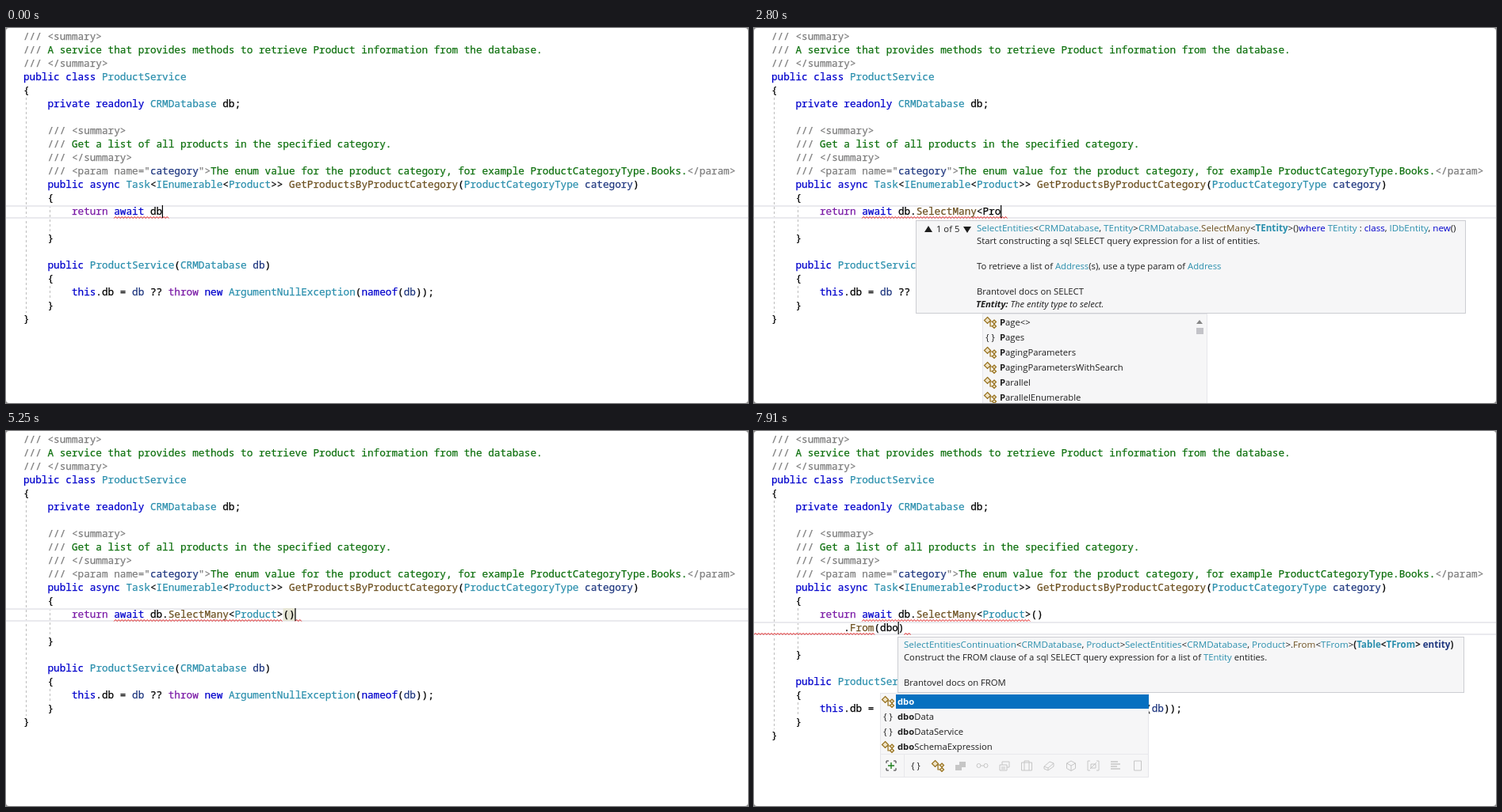
Write an HTML page that moves like this. It is 936 px wide and 474 px high and loops after 8000 ms.

```html
<!DOCTYPE html>
<html lang="en">
<head>
<meta charset="utf-8">
<title>Code completion</title>
<style>
  html, body { margin: 0; width: 100%; height: 100%; overflow: hidden; background: #8c8c8c; }
  svg { display: block; width: 936px; height: 474px; background: #fff; border-radius: 4px; }
  text, tspan { white-space: pre; fill: currentColor; }
  .code text, .code tspan { stroke: currentColor; stroke-width: .25px; }
  .code text { font: 500 12.695px "Noto Sans Mono", "DejaVu Sans Mono", monospace; color: #000; }
  .ui text { font: 11.25px "Open Sans", "Noto Sans", sans-serif; color: #1e1e1e; }
  .ui text.on { color: #fff; }
  .ui text.sign { font-size: 11.6px; }
  .k { color: #0000cc; } .c { color: #7a1aa6; } .t { color: #2b8fad; } .m { color: #6c5020; }
  .v { color: #1f377f; } .g { color: #7c7c7c; } .d { color: #0e700e; }
  .b { font-weight: 700; } .i { font-style: italic; }
</style>
</head>
<body>
<svg id="stage" viewBox="0 0 936 474"></svg>
<script>
const LOOP = 8000, CHAR = 7.617, ROW = 17, LEFT = 22, TOP = 3, ITEM = 19;
const stage = document.getElementById('stage');
const colX = col => LEFT + col * CHAR;
const rowY = row => TOP + row * ROW;

// Markup: [classes:text], one letter per class
const rich = s => s.replace(/&/g, '&amp;').replace(/</g, '&lt;')
  .replace(/\[(\w+):(.*?)\]/g, (_, c, body) => `<tspan class="${[...c].join(' ')}">${body}</tspan>`);
const plain = s => s.replace(/\[\w+:(.*?)\]/g, '$1');
const text = (x, y, s, cls = '') => `<text x="${x}" y="${y}" class="${cls}">${rich(s)}</text>`;
const rect = (x, y, w, h, fill, stroke = 'none') =>
  `<rect x="${x}" y="${y}" width="${w}" height="${h}" fill="${fill}" stroke="${stroke}"/>`;
const path = (d, stroke, fill = 'none', width = 1) =>
  `<path d="${d}" stroke="${stroke}" fill="${fill}" stroke-width="${width}"/>`;
const at = (x, y, body) => `<g transform="translate(${x} ${y})">${body}</g>`;

// ---- Code ----
const head = [
  '[g:/// <summary>]',
  '[g:///] [d:A service that provides methods to retrieve Product information from the database.]',
  '[g:/// </summary>]',
  '[k:public class] [t:ProductService]',
  '{',
  '    [k:private readonly] [t:CRMDatabase] db;',
  '',
  '    [g:/// <summary>]',
  '    [g:///] [d:Get a list of all products in the specified category.]',
  '    [g:/// </summary>]',
  '    [g:/// <param name="][v:category][g:">][d:The enum value for the product category, for example ProductCategoryType.Books.][g:</param>]',
  '    [k:public async] [t:Task]<[t:IEnumerable]<[t:Product]>> [m:GetProductsByProductCategory]([t:ProductCategoryType] [v:category])',
  '    {'
];
const tail = [
  '    }',
  '',
  '    [k:public] [t:ProductService]([t:CRMDatabase] [v:db])',
  '    {',
  '        [k:this].db = [v:db] ?? [c:throw] [k:new] [t:ArgumentNullException]([k:nameof]([v:db]));',
  '    }',
  '}'
];
const codeRow = (row, s) => text(LEFT, rowY(row) + 12, s);

function squiggle(x0, x1, row) {
  const n = Math.max(1, Math.round((x1 - x0) / 4));
  return path(`M${x0} ${rowY(row) + 16.5}` + 'l2-2l2 2'.repeat(n), '#e01010');
}

function editLine(row, s, from, active) {
  const shown = plain(s), caret = shown.indexOf('^'), bare = shown.replace('^', '');
  const paren = bare.indexOf('('), stop = paren < 0 ? bare.length : paren;
  let out = squiggle(from, colX(stop), row);
  if (active) out += squiggle(colX(bare.length), colX(bare.length) + 7, row);
  out += codeRow(row, s.replace('^', ''));
  if (caret >= 0) out += rect(colX(caret) - .4, rowY(row), 1.2, 16, '#000');
  return out;
}

function editor({ first, second, braces }) {
  const split = second !== undefined, shift = split ? 1 : 0, row = 13 + shift, y = rowY(row);
  const guide = (x, a, b) => `<path d="M${x} ${rowY(a)}V${rowY(b)}" stroke="#bdbdbd" stroke-dasharray="3 3"/>`;
  let out = guide(25.5, 5, 21 + shift) + guide(55.5, 13, 15 + shift) + guide(55.5, 19 + shift, 20 + shift);
  out += rect(0, y, 936, 2, '#eaeaee') + rect(0, y + 15, 936, 2, '#eaeaee');
  if (braces) out += rect(colX(43), y, 2 * CHAR, 16, '#e6e5d4');
  head.forEach((s, i) => out += codeRow(i, s));
  tail.forEach((s, i) => out += codeRow(15 + shift + i, s));
  out += editLine(13, '        [c:return] [k:await] db' + first, colX(15), !split);
  if (split) out += editLine(14, '            ' + second, 0, true);
  return `<g class="code">${out}</g>`;
}

// ---- Icons, drawn around their centre ----
const cube = (stroke, fill) => path('M0-6L5.5-3V3.5L0 6.5L-5.5 3.5V-3ZM-5.5-3L0 0L5.5-3M0 0V6.5', stroke, fill);
const icons = {
  cube: cube('#6936aa', '#eee5f7'),
  wrench: path('M-5.5 5.5L1-1', '#2a2a2a', 'none', 2.6) + path('M6-3.5A3.4 3.4 0 1 1 2.5-6L2-3L3.5-2Z', '#2a2a2a', '#2a2a2a'),
  type: path('M-3.5-6.5L.5-2.5L-3.5 1.5L-7.5-2.5ZM5-3L7.5-.5L5 2L2.5-.5ZM5 2.5L7.5 5L5 7.5L2.5 5ZM0-1H3M0-1V5H3', '#96701c', '#efe3c6', 1.2),
  space: '<text y="4" text-anchor="middle">{ }</text>',
  expand: path('M-6-3V-6H-3M3-6H6V-3M6 3V6H3M-3 6H-6V3', '#333') + path('M0-4V4M-4 0H4', '#1f801f', 'none', 1.4)
};
const pale = '#c6c6c6';
const paleIcons = [
  rect(-6, -1, 8, 7, pale) + rect(-1, -5, 8, 7, pale),
  path('M-7 0a2.5 2.5 0 1 0 5 0a2.5 2.5 0 1 0-5 0M-2 0H2a2.5 2.5 0 1 0 5 0a2.5 2.5 0 1 0-5 0', pale),
  path('M-6-1H3V6H-6ZM-3-1V-5H6V2H3M-4 2H1M-4 4H1', pale),
  path('M-6.5-4H6.5V6H-6.5ZM-3-4V-6H3V-4M-3-4V6M3-4V6', pale),
  path('M-6 1L1-5L6-3V1L-1 6L-6 4ZM-6 1L-1 3L6-3M-1 3V6', pale),
  cube(pale, 'none'),
  path('M-4-6H-7V6H-4M4-6H7V6H4M-4 4L4-4M-3-2H3V3H-3Z', pale),
  path('M-6-5H3M-6-2H6M-6 1H2M-6 4H6', pale, 'none', 1.5),
  path('M-4.5-6H4.5V6H-4.5Z', pale)
];

// ---- Popups ----
const C = 'cube', F = 'wrench', T = 'type', N = 'space';

function list({ x, y, w, items, sel = -1, thumb, filters, extra = false }) {
  const bar = y + ITEM * items.length + 1, right = thumb ? 18 : 0;
  let out = rect(x + .5, y + .5, w - 1, ITEM * items.length + 30, '#f6f6f7', '#e6e6ea');
  items.forEach(([icon, label], i) => {
    const mid = y + 11 + ITEM * i, on = i === sel;
    if (on) out += rect(x + 20, mid - 9, w - 20 - right, ITEM - 1, '#0670c0');
    out += at(x + 10, mid, icons[icon]) + text(x + 22, mid + 4, label, on ? 'on' : '');
  });
  if (thumb) {
    const cx = x + w - 10;
    out += path(`M${cx - 4} ${y + 13}h8l-4-5zM${cx - 4} ${y + 161}h8l-4 5z`, 'none', '#868686');
    out += rect(cx - 4, y + thumb[0], 9, thumb[1], '#c3c3c8');
  }
  out += path(`M${x} ${bar + .5}H${x + w}M${x + 30.5} ${bar}v29`, '#e8e8ec');
  const mid = bar + 15;
  out += at(x + 14, mid, icons.expand);
  filters.forEach((icon, i) => out += at(x + 45 + 28 * i, mid, icons[icon]));
  if (extra) paleIcons.forEach((body, i) => out += at(x + 101 + 28 * i, mid, body));
  return out;
}

// The first row of a tip is the signature
function tip(x, y, w, h, inset, lines, overloads) {
  let out = rect(x + .5, y + .5, w - 1, h - 1, '#f6f6f7', '#cccdd2');
  if (overloads) {
    out += path(`M${x + 11} ${y + 15}h10l-5-8zM${x + 60} ${y + 8}h10l-5 8z`, 'none', '#1e1e1e') + text(x + 26, y + 15, '1 of 5');
  }
  lines.forEach(([dx, row, s]) => out += text(x + inset + dx, y + 14 + 16 * row, s, row ? '' : 'sign'));
  return out;
}

const memberList = (items, sel) =>
  list({ x: 204, y: 243, w: 124, items, sel, thumb: [19, 81], filters: [F, C] });
const typeList = (items, sel) =>
  list({ x: 288, y: 361, w: 284, items, sel, thumb: [18, 8], filters: [N, T] });
const fromList = (items, sel) =>
  list({ x: 121, y: 260, w: 124, items, sel, filters: [F, C] });
const argList = (y, items) =>
  list({ x: 159, y, w: 339, items, sel: 0, filters: [N, T], extra: true });

const selectTip = tip(204, 243, 694, 118, 77, [
  [0, 0, '[t:SelectEntities]<[t:CRMDatabase], [t:TEntity]>'],
  [204, 0, '[t:CRMDatabase].[m:SelectMany]<[tb:TEntity]>()'],
  [406, 0, '[k:where] [t:TEntity] : [k:class], [t:IDbEntity], [k:new]()'],
  [0, 1, 'Start constructing a sql SELECT query expression for a list of entities.'],
  [0, 3, 'To retrieve a list of [t:Address](s), use a type param of [t:Address]'],
  [0, 5, 'Brantovel docs on SELECT'],
  [-1, 6, '[bi:TEntity:] [i:The entity type to select.]']
], true);
const callTip = tip(204, 243, 450, 71, 8, [
  [0, 0, '[t:SelectEntities]<[t:CRMDatabase], [t:Product]> [t:CRMDatabase].[m:SelectMany]<[t:Product]>()'],
  [0, 1, 'Start constructing a sql SELECT query expression for a list of entities.'],
  [0, 3, 'Brantovel docs on SELECT']
]);
const fromTip = tip(181, 260, 715, 71, 8, [
  [0, 0, '[t:SelectEntitiesContinuation]<[t:CRMDatabase], [t:Product]>'],
  [279, 0, '[t:SelectEntities]<[t:CRMDatabase], [t:Product]>.[m:From]<[t:TFrom]>[b:(][tb:Table][b:<][tb:TFrom][b:>] [vb:entity][b:)]'],
  [0, 1, 'Construct the FROM clause of a sql SELECT query expression for a list of [t:TEntity] entities.'],
  [0, 3, 'Brantovel docs on FROM']
]);

const members = memberList([[C, 'Delete'], [C, 'Equals'], [F, 'fx'], [C, 'GetHashCode'], [C, 'GetType'],
  [C, 'Insert'], [C, 'SelectMany'], [C, 'SelectOne'], [F, 'sp']], -1);
const membersS = memberList([[C, 'SelectMany'], [C, '[b:S]electMany<>'], [C, '[b:S]electOne'], [C, '[b:S]electOne<>'],
  [F, '[b:s]p'], [C, 'To[b:S]tring'], [C, 'Delete'], [C, 'Equals'], [F, 'fx']], 0);
const typesP = typeList([[T, '[b:P]age<>'], [N, '[b:P]ages'], [T, '[b:P]agingParameters'], [T, '[b:P]agingParametersWithSearch'],
  [T, '[b:P]arallel'], [T, '[b:P]arallelEnumerable'], [T, '[b:P]arallelQuery']], -1);
const typesPro = typeList([[T, '[b:Pro]duct'], [T, '[b:Pro]ductCategory'], [T, '[b:Pro]ductCategoryType'], [T, '[b:Pro]ductService'],
  [T, '[b:Pro]gram'], [T, '[b:Pro]gress<>'], [N, '[b:Pro]ducts']], 0);
const fromItems = [[C, 'Equals'], [C, 'From'], [C, 'From<>'], [C, 'GetHashCode'], [C, 'GetType'],
  [C, 'Limit'], [C, 'OrderBy'], [C, 'ToString'], [C, 'Where']];
const continuations = fromList(fromItems, -1), continuationsF = fromList(fromItems, 1);
const argsD = argList(260, [[T, '[b:d]bo'], [N, '[b:d]boData'], [N, '[b:d]boDataService'], [T, '[b:d]boSchemaExpression'],
  [T, '[b:D]ateOnly'], [T, '[b:D]ateTime'], [T, '[b:D]BNull'], [T, '[b:D]ecimal'], [T, '[b:D]elegate']]);
const argsDbo = argList(331, [[T, '[b:dbo]'], [N, '[b:dbo]Data'], [N, '[b:dbo]DataService'], [T, '[b:dbo]SchemaExpression']]);

// ---- Timeline: each step overrides part of the state before it ----
const many = '.[m:SelectMany]', generic = many + '<[t:Product]>', from = '.[m:From]';
const steps = [
  [0, { first: '^', popup: '' }],
  [70, { first: '.^' }],
  [140, { popup: members }],
  [770, { first: '.S^' }],
  [840, { popup: membersS }],
  [1050, { first: '.Se^' }],
  [1120, { first: '.Sel^' }],
  [1400, { first: many + '^', popup: '' }],
  [1890, { first: many + '<^' }],
  [2240, { popup: selectTip }],
  [2590, { first: many + '<P^' }],
  [2730, { first: many + '<Pr^', popup: selectTip + typesP }],
  [2800, { first: many + '<Pro^' }],
  [2870, { popup: selectTip + typesPro }],
  [3010, { first: many + '<Prod^' }],
  [3080, { first: many + '<Produ^' }],
  [3220, { first: many + '<Produc^' }],
  [3290, { first: many + '<Product^' }],
  [3500, { popup: selectTip }],
  [3780, { first: many + '<[t:Product]^' }],
  [4060, { first: many + '<[t:Product]' }],
  [4200, { first: many + '<[t:Product]^' }],
  [4410, { first: generic + '^', popup: '' }],
  [4900, { first: generic + '(^)' }],
  [4970, { popup: callTip }],
  [5180, { first: generic + '()^', popup: '' }],
  [5250, { braces: true }],
  [5390, { first: generic + '()', second: '^', braces: false }],
  [5810, { second: '.^', popup: continuations }],
  [6020, { second: '.F^', popup: continuationsF }],
  [6160, { second: '.Fr^' }],
  [6300, { second: '.Fro^' }],
  [6440, { second: '.From^' }],
  [6580, { second: from + '^', popup: '' }],
  [6930, { second: from + '(^)' }],
  [7000, { popup: fromTip }],
  [7210, { second: from + '(d^)', popup: '' }],
  [7420, { popup: argsD }],
  [7630, { second: from + '(db^)' }],
  [7840, { second: from + '(dbo^)', popup: fromTip + argsDbo }]
];
let state = {};
const scenes = steps.map(([time, change]) => [time, state = { ...state, ...change }]);

let current = -1;
function frame(now) {
  const t = now % LOOP;
  const index = scenes.findLastIndex(([time]) => time <= t);
  if (index !== current) {
    current = index;
    const scene = scenes[index][1];
    stage.innerHTML = editor(scene) + `<g class="ui">${scene.popup}</g>`;
  }
  requestAnimationFrame(frame);
}
frame(0);
</script>
</body>
</html>
```
